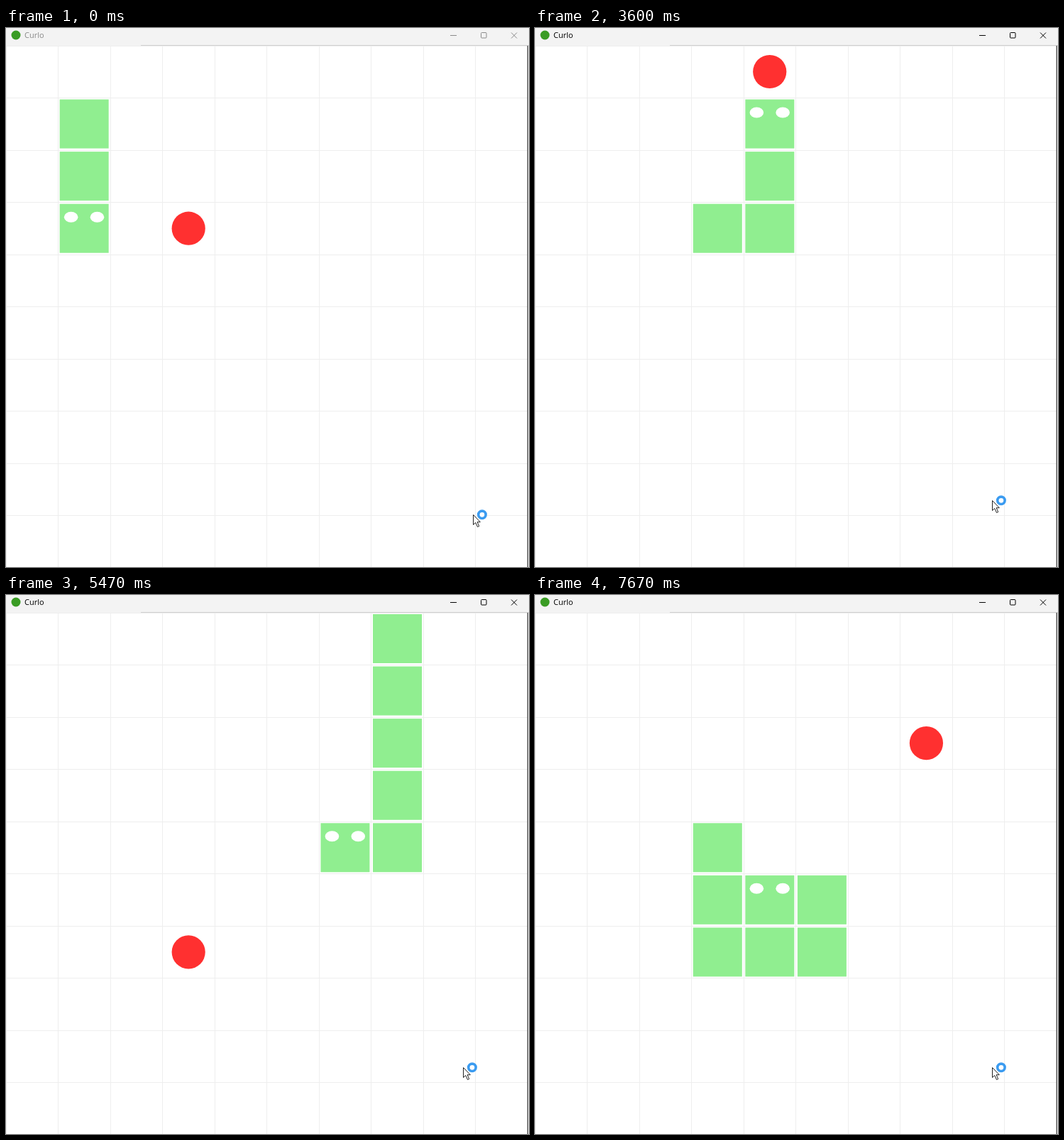
These frames come from a looping animation (737 by 759 pixels, 8000 ms). An HTML page with a canvas:

```html
<!DOCTYPE html>
<html lang="en">
<head>
<meta charset="utf-8">
<title>Curlo</title>
<style>
  html, body { margin: 0; width: 100%; height: 100%; overflow: hidden; background: #fff; }
  canvas { display: block; }
</style>
</head>
<body>
<canvas id="stage" width="737" height="759"></canvas>
<script>
const ctx = document.getElementById('stage').getContext('2d');
const LOOP = 8000, CELL = 73.56, SIZE = 69;
const DIRS = { R: [1, 0], L: [-1, 0], U: [0, -1], D: [0, 1] };
const ARROW = new Path2D('M0 0V14L3.2 11L6 17L8.2 16L5.6 10.2H9.8Z');

// Times of the moves and their directions
const times = [1270, 1470, 2070, 2330, 3600, 3870, 4130, 4330, 4530, 4730, 4930, 5070,
  5200, 5470, 5600, 5800, 6000, 6330, 6600, 6870, 7070, 7330, 7670];
const moves = 'RRRUUURRRDDDDLLLLDDRRUL';
const foods = [[3, 3], [4, 0], [7, 0], [3, 6], [7, 2]];

const path = [[1, 1], [1, 2], [1, 3]];
for (const m of moves) {
  const [x, y] = path[path.length - 1], [dx, dy] = DIRS[m];
  path.push([x + dx, y + dy]);
}
// Step of the path at which each food is eaten
const meals = [];
for (let i = 2; i < path.length; i++) {
  if (String(path[i]) === String(foods[meals.length])) meals.push(i);
}

const cellX = col => 2.1 + col * CELL;
const cellY = row => 27 + row * CELL;

function rect(color, x, y, w, h) {
  ctx.fillStyle = color;
  ctx.fillRect(x, y, w, h);
}

function ellipse(color, x, y, rx, ry = rx) {
  ctx.fillStyle = color;
  ctx.beginPath();
  ctx.ellipse(x, y, rx, ry, 0, 0, 2 * Math.PI);
  ctx.fill();
}

function drawWindow(active) {
  rect('#fff', 0, 0, 737, 759);
  for (let i = 0; i < 10; i++) {
    const at = Math.floor(i * 73.51);
    rect('#eee', at, 25, 1, 734);
    rect('#eee', 0, at + 25, 735, 1);
  }
  rect('#555', 734.5, 25, 1.5, 734);
  rect('#f3f3f3', 0, 0, 737, 25);
  rect('#cfcfcf', 190, 24, 547, 1);
  ellipse('#3a9c24', 14, 10, 6.5);

  ctx.fillStyle = ctx.strokeStyle = active ? '#000' : '#8a8a8a';
  ctx.font = '11px "Open Sans", "Noto Sans", sans-serif';
  ctx.fillText('Curlo', 26, 14);
  ctx.lineWidth = 1;
  ctx.beginPath();
  ctx.moveTo(626, 10.5);
  ctx.lineTo(635, 10.5);
  ctx.roundRect(669.5, 6.5, 7.5, 7.5, 1);
  ctx.moveTo(712, 6.5);
  ctx.lineTo(720, 14.5);
  ctx.moveTo(720, 6.5);
  ctx.lineTo(712, 14.5);
  ctx.stroke();
}

function drawGame(t) {
  const head = 2 + times.filter(at => at <= t).length;
  const eaten = meals.filter(i => i <= head).length;
  const length = 3 + meals.filter(i => i < head).length;
  for (const [col, row] of path.slice(head + 1 - length, head + 1)) {
    rect('#90ee90', cellX(col), cellY(row), SIZE, SIZE);
  }
  const [hx, hy] = path[head];
  for (const dx of [16, 52.8]) ellipse('#fff', cellX(hx) + dx, cellY(hy) + 18.5, 9.8, 7.5);
  const [fx, fy] = foods[eaten];
  ellipse('#ff3030', cellX(fx) + 34.4, cellY(fy) + 34.5, 23.6);
}

function drawCursor(t) {
  const step = t < 70 ? 0 : t < 130 ? 0.5 : 1;
  ctx.save();
  ctx.translate(658.5 - 14 * step, 685.5 - 20 * step);
  ctx.fillStyle = '#fff';
  ctx.strokeStyle = '#222';
  ctx.lineWidth = 1;
  ctx.fill(ARROW);
  ctx.stroke(ARROW);
  ellipse('#fff', 12.4, -0.2, 5);
  ctx.strokeStyle = '#3a9bf0';
  ctx.lineWidth = 3.6;
  ctx.beginPath();
  ctx.arc(12.4, -0.2, 5.2, 0, 2 * Math.PI);
  ctx.stroke();
  ctx.restore();
}

const start = performance.now();
function draw() {
  const t = (performance.now() - start) % LOOP;
  drawWindow(t >= 400);
  drawGame(t);
  drawCursor(t);
  requestAnimationFrame(draw);
}
draw();
</script>
</body>
</html>
```
